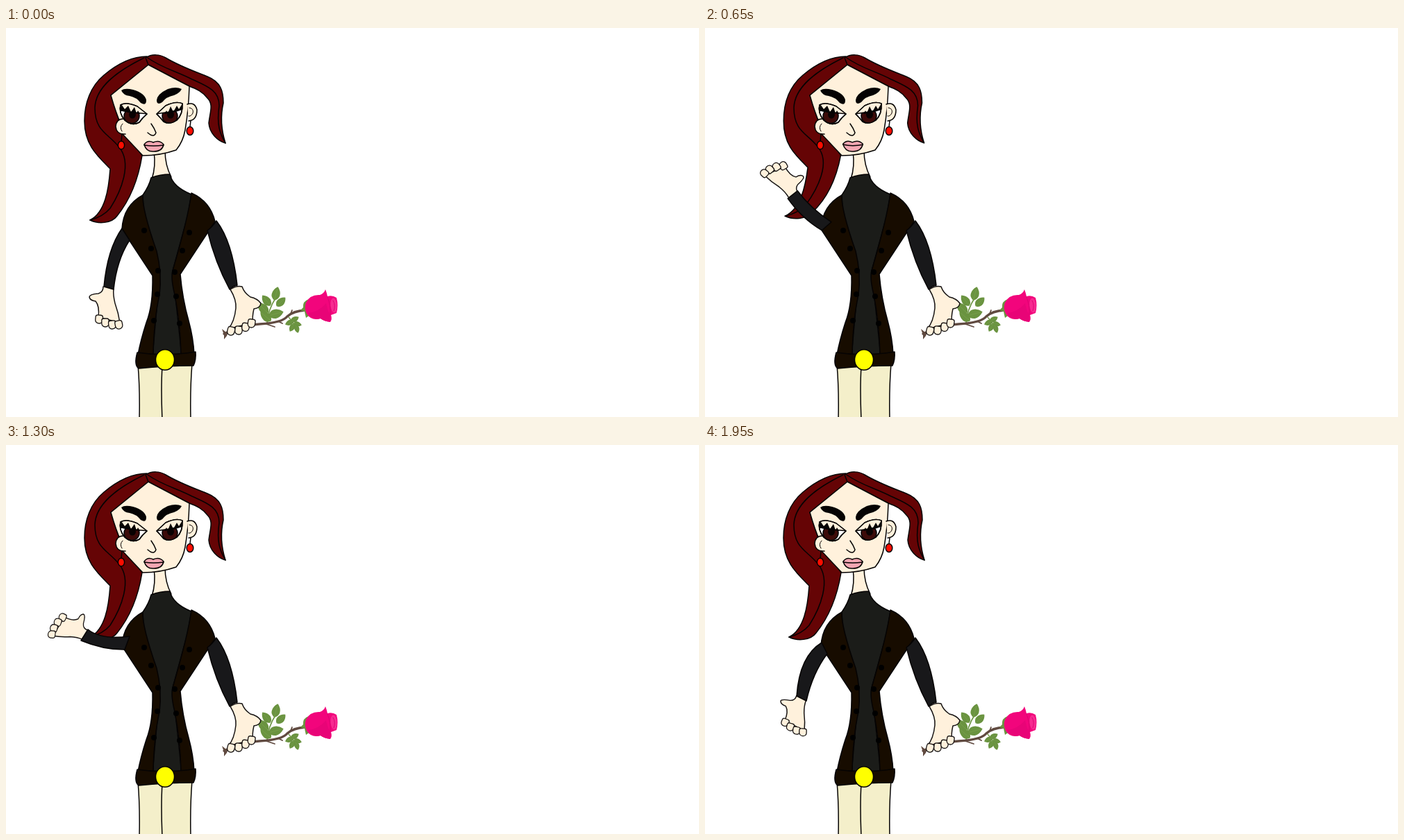
These frames come from a looping animation (998x561 px, 2 s). An HTML page with a canvas:

```html
<!DOCTYPE html>
<html lang="en">
<head>
<meta charset="utf-8">
<title>Woman with a rose</title>
<style>
html, body { margin: 0; width: 100%; height: 100%; overflow: hidden; background: #fff; }
canvas { display: block; width: 100vw; height: 100vh; }
</style>
</head>
<body>
<canvas id="stage" width="998" height="561"></canvas>
<script>
const ctx = document.getElementById('stage').getContext('2d');
const LOOP = 2000, STEP = 50;
const INK = '#050303', SKIN = '#fff1dc', HAIR = '#650405', VEST = '#170c00',
      KNIT = '#1b1c19', SLEEVE = '#18181a', LEAF = '#6a9340', STEM = '#604a40', PINK = '#f2057c';

const lerp = (a, b, k) => a + (b - a) * k;
const ramp = (t, a, b) => {
  const k = Math.min(1, Math.max(0, (t - a) / (b - a)));
  return k * k * (3 - 2 * k);
};

function shape(d, fill, line = INK, width = 1.5) {
  const p = typeof d === 'string' ? new Path2D(d) : d;
  if (fill) { ctx.fillStyle = fill; ctx.fill(p); }
  if (line) { ctx.strokeStyle = line; ctx.lineWidth = width; ctx.stroke(p); }
}
function oval(x, y, rx, ry, fill, line, turn = 0, width) {
  const p = new Path2D();
  p.ellipse(x, y, rx, ry, turn, 0, 7);
  shape(p, fill, line, width);
}
// Moves every "x,y" pair of a path string
const warp = (d, move) => d.replace(/([\d.]+),([\d.]+)/g, (_, x, y) => move(+x, +y).join(','));
function mix(a, b, k) {
  const to = b.match(/[\d.]+/g);
  let i = 0;
  return a.replace(/[\d.]+/g, n => lerp(+n, +to[i++], k));
}

function hair(sway) {
  // The edge next to the neck swings less than the free tail
  const tail = (x, y) => {
    const k = sway * Math.max(0, (y - 165) / 112) * (x > 175 ? .5 : 1);
    return [x - 22 * k + sway * (x < 120 && y < 160 ? 1 : 0), y - 22 * k];
  };
  const lock = (x, y) => [x - sway * 2 * Math.max(0, (x - 250) / 66), y - (y > 150 ? sway : 0)];
  shape(warp('M203,41 C182,41 160,52 141,68 C122,84 113,108 113,134 C113,168 131,184 150,203 ' +
    'C148,232 143,266 121,277 C133,283 152,282 160,271 C181,245 191,215 196,184 ' +
    'L165,140 L151,97 L205,53 Z', tail), HAIR);
  shape(warp('M199,43 C160,62 129,85 128,115 C128,150 148,152 163,172 ' +
    'C182,195 166,235 150,260 Q140,272 121,277', tail));
  shape(warp('M201,43 C210,37 222,38 230,43 C250,55 270,62 290,70 C310,78 313,92 313,108 ' +
    'C308,130 311,150 316,166 C305,163 293,152 292,137 C294,120 299,110 290,101 ' +
    'C283,92 275,88 264,84 L205,53 Z', lock), HAIR);
  shape(warp('M204,43 C225,58 245,62 268,74 C290,84 307,90 307,112 C303,140 308,152 316,166', lock));
}

function eye(outline, lid, iris, lashes, shutLid, shutLashes, shut) {
  shape(outline, shut ? SKIN : '#fff');
  ctx.save();
  ctx.clip(new Path2D(outline));
  if (!shut) {
    oval(iris, 127, 11, 10.5, '#3d0b09', INK);
    oval(iris + 1, 125, 5, 5.5, '#0a0202', null);
    shape(lid, SKIN);
  }
  ctx.restore();
  shape(outline);
  if (shut) shape(shutLid);
  shape(shut ? shutLashes : lashes, INK, null);
}

function face(shut, smile) {
  shape('M213,178 Q216,200 210,218 L238,215 Q229,198 229,176 Z', SKIN);
  shape('M205,53 L151,97 Q158,122 166,140 L165,150 L197,184 Q222,184 245,176 Q255,164 258,147 Q263,118 264,84 Z', SKIN);
  shape('M169,131 Q159,131 158,142 Q159,154 172,153', SKIN);
  shape('M168,138 Q163,143 167,149', null, INK, 1);
  shape('M261,110 Q272,106 275,118 Q275,133 263,134', SKIN);
  shape('M264,115 Q271,116 269,123 Q266,128 263,127', null, INK, 1);
  shape('M167,153 L166,164 M266,134 L265,142');
  oval(166, 169, 4.6, 5.8, '#ff0d00', INK);
  oval(265, 148.5, 4.8, 6, '#ff0d00', INK);

  shape('M166,90 Q171,86 183,89 Q200,94 202,104 Q202,113 194,108 Q188,100 178,98 Q169,97 166,90 Z', INK, null);
  shape('M253,88 Q245,84 233,88 Q218,95 217,104 Q217,112 225,107 Q231,99 242,97 Q250,94 253,88 Z', INK, null);

  eye('M203,124 L189,113 Q173,106 165,111 Q162,122 171,133 Q181,142 192,136 Q196,130 203,124 Z',
    'M160,118 Q180,122 206,124 L200,100 L160,100 Z', 181,
    'M164,119 L166,110 L171,117 L176,112 L180,121 L185,114 L188,123 L190,119 L193,124 Q178,123 164,119 Z',
    'M166,127 Q182,134 200,126',
    'M166,128 L171,117 L175,124 L180,120 L183,125 L187,121 L190,126 L195,123 L196,129 Q180,132 166,128 Z', shut);
  eye('M217,124 L230,112 Q245,105 254,109 Q255,124 246,133 Q236,140 227,135 Q222,129 217,124 Z',
    'M214,124 Q236,122 258,116 L258,100 L217,100 Z', 236,
    'M228,124 L231,119 L233,123 L237,113 L241,121 L246,112 L249,117 L254,109 L253,118 Q241,123 228,124 Z',
    'M219,126 Q236,134 252,126',
    'M222,129 L226,123 L230,126 L233,120 L237,125 L241,117 L244,122 L248,114 L251,126 Q238,132 222,129 Z', shut);

  shape('M209,138 Q214,145 216,151 Q214,157 208,154 L204,151');
  shape(mix('M199,168 Q204,161 212,165 Q221,161 227,168 Q225,178 213,178 Q202,179 199,168 Z',
    'M197,163 Q204,159 213,164 Q222,159 229,163 Q227,179 214,178 Q202,178 197,163 Z', smile), '#f4a7b3');
  shape(mix('M199,169 Q212,171 227,169', 'M197,163 Q213,172 229,164', smile));
}

function body() {
  shape('M190,486 Q193,520 192,565 L266,565 Q265,520 268,484 Z', '#f4efca');
  shape('M225,488 Q223,520 225,565');
  shape('M209,216 Q222,211 236,211 Q240,229 267,240 L262,270 L240,350 L253,472 L211,472 L222,350 L198,262 L197,241 Q206,228 209,216 Z', KNIT);
  shape('M197,241 Q169,256 167,290 L211,357 Q212,400 202,425 Q194,450 190,471 L212,472 ' +
    'Q213,420 221,385 Q225,355 217,322 Q196,262 197,241 Z', VEST);
  shape('M267,238 Q294,250 301,279 L251,355 Q254,390 263,422 Q270,448 271,471 L252,472 ' +
    'Q251,425 243,385 Q237,360 240,350 Q262,275 267,238 Z', VEST);
  const buttons = [[199, 292], [209, 318], [219, 350], [218, 384], [213, 422],
                   [264, 295], [254, 321], [243, 352], [245, 387], [250, 426]];
  for (const [x, y] of buttons) oval(x, y, 4, 4, '#000', null);
  shape('M189,468 Q229,474 273,467 Q274,478 270,487 Q230,487 191,491 Q184,486 189,468 Z', VEST);
  oval(229, 478.5, 13.5, 14.8, '#ffff00', INK);
}

function leaf(x, y, size, deg) {
  ctx.save();
  ctx.translate(x, y);
  ctx.rotate(deg * Math.PI / 180);
  ctx.scale(size, size);
  shape('M0,-10 Q6,-5 6,2 Q5,8 0,10 Q-6,7 -6,2 Q-6,-5 0,-10 Z', LEAF, null);
  shape('M0,-7 L0,9', null, '#7fa653', .5);
  ctx.restore();
}

function rose() {
  shape('M376,425 Q378,405 388,390', null, LEAF, 1.6);
  leaf(389, 383, 1, 15);
  leaf(375, 393, .95, -38);
  leaf(396, 395, .9, 45);
  leaf(370, 404, 1.05, -45);
  leaf(389, 412, 1.1, 75);
  leaf(374, 416, 1, -50);
  shape('M407,417 Q413,423 418,434', null, LEAF, 1.3);
  leaf(416, 420, .65, 60);
  leaf(408, 425, .65, -115);
  leaf(420, 427, .6, 105);
  leaf(412, 432, .65, -150);
  leaf(419, 434, .6, 165);

  shape('M314,441 Q340,428 365,427 Q398,425 405,416 Q414,408 431,407', null, STEM, 3.4);
  shape('M311,434 L316,438 L320,439 L318,444 L314,449 L314,443 Z', STEM, null);
  shape('M375,427 L387,431 M410,412 L412,407 M392,423 L398,426', null, STEM, 1.8);

  shape('M436,391 Q427,394 428,403 L424,407 L430,409 L432,418 L439,413 Z', LEAF, null);
  shape('M432,396 Q438,384 452,385 Q458,383 460,377 Q462,382 463,387 Q470,385 476,389 ' +
    'Q479,400 476,411 L468,414 Q470,420 467,424 Q458,423 453,419 Q440,423 433,412 Q429,404 432,396 Z', PINK, null);
  shape('M435,411 Q450,410 461,397 Q463,408 467,414 L467,424 Q458,423 453,419 Q440,422 435,411 Z', '#e80477', null);
  oval(472, 400, 4.6, 10.5, '#f72b91', null, -.08);
  shape('M463,388 Q468,400 467,413 M471,393 Q475,400 472,408', null, '#d80570', .9);
}

function finger(x, y, turn) {
  ctx.save();
  ctx.translate(x, y);
  ctx.rotate(turn);
  const p = new Path2D();
  p.roundRect(-5.2, -6, 10.4, 12, [3, 3, 5, 5]);
  shape(p, SKIN, '#161313', 1.3);
  ctx.restore();
}

function restArm() {
  shape('M290,292 Q297,287 303,278 Q326,308 333,371 Q327,372 322,377 Q301,338 290,292 Z', SLEEVE);
  shape('M323,377 Q332,392 331,404 Q329,424 320,434 L356,425 Q354,418 357,405 Q366,404 367,397 ' +
    'Q362,390 352,388 Q343,382 340,373 Q332,371 323,377 Z', SKIN, '#161313');
  finger(324, 437, .25);
  finger(335, 436, .1);
  finger(345, 431.5, .15);
  finger(353.5, 426, .15);
}

// Outer edge: wrist, middle, shoulder; inner edge: shoulder, middle, wrist; hand turn, hand length
const down = [141, 373, 150, 325, 167, 289, 178, 306, 163, 338, 155, 377, 0, 1];
const side = [109, 283, 142, 282, 176, 285, 174, 303, 140, 299, 109, 301, 82, 1.08];
const lift = [124, 240, 150, 262, 180, 279, 170, 293, 139, 278, 110, 255, 128, 1];
const high = [147, 227, 163, 255, 185, 281, 166, 290, 146, 263, 133, 232, 167, .82];
const fall = [130, 244, 152, 264, 181, 278, 169, 293, 144, 279, 118, 256, 142, .84];
const open = [118, 266, 142, 276, 178, 276, 171, 295, 140, 292, 108, 282, 109, .85];
const low = [112, 303, 140, 285, 172, 279, 175, 300, 144, 304, 115, 320, 71, .75];
const near = [132, 362, 143, 314, 168, 285, 176, 301, 158, 332, 146, 369, 15, .88];
const poses = [[0, down], [400, side], [550, lift], [800, high], [850, high], [1100, fall],
               [1300, open], [1420, side], [1600, low], [1950, near], [2000, down]];

function poseAt(t) {
  const i = poses.findIndex(p => p[0] > t);
  const [t0, a] = poses[i - 1], [t1, b] = poses[i];
  return a.map((v, n) => lerp(v, b[n], (t - t0) / (t1 - t0)));
}

function wavingArm(t) {
  const p = poseAt(t);
  // Control value that makes the curve pass through the middle point
  const bend = i => 2 * p[i] - (p[i - 2] + p[i + 2]) / 2;
  ctx.save();
  ctx.translate((p[0] + p[10]) / 2, (p[1] + p[11]) / 2);
  ctx.rotate(p[12] * Math.PI / 180);
  ctx.scale(1, p[13]);
  shape('M-8,-2 Q-8,6 -15,8 Q-28,9 -28,13 Q-27,18 -19,19 Q-13,26 -15,42 L16,50 Q14,36 9,22 Q6,10 7,1', SKIN, '#161313');
  finger(-14, 45, .1);
  finger(-5, 50, 0);
  finger(5, 53, -.1);
  finger(14.5, 53, -.2);
  ctx.restore();

  const s = new Path2D();
  s.moveTo(p[0], p[1]);
  s.quadraticCurveTo(bend(2), bend(3), p[4], p[5]);
  s.lineTo(p[6], p[7]);
  s.quadraticCurveTo(bend(8), bend(9), p[10], p[11]);
  s.closePath();
  shape(s, SLEEVE);
}

function draw(now) {
  const t = Math.floor(now % LOOP / STEP) * STEP;
  ctx.fillStyle = '#fff';
  ctx.fillRect(0, 0, 998, 561);
  ctx.lineJoin = ctx.lineCap = 'round';
  hair(ramp(t, 600, 750) * (1 - ramp(t, 1100, 1250)));
  face(t >= 700 && t < 1000, ramp(t, 600, 800) * (1 - ramp(t, 950, 1200)));
  body();
  rose();
  restArm();
  wavingArm(t);
}

const start = performance.now();
function tick() {
  draw(performance.now() - start);
  requestAnimationFrame(tick);
}
tick();
</script>
</body>
</html>
```
